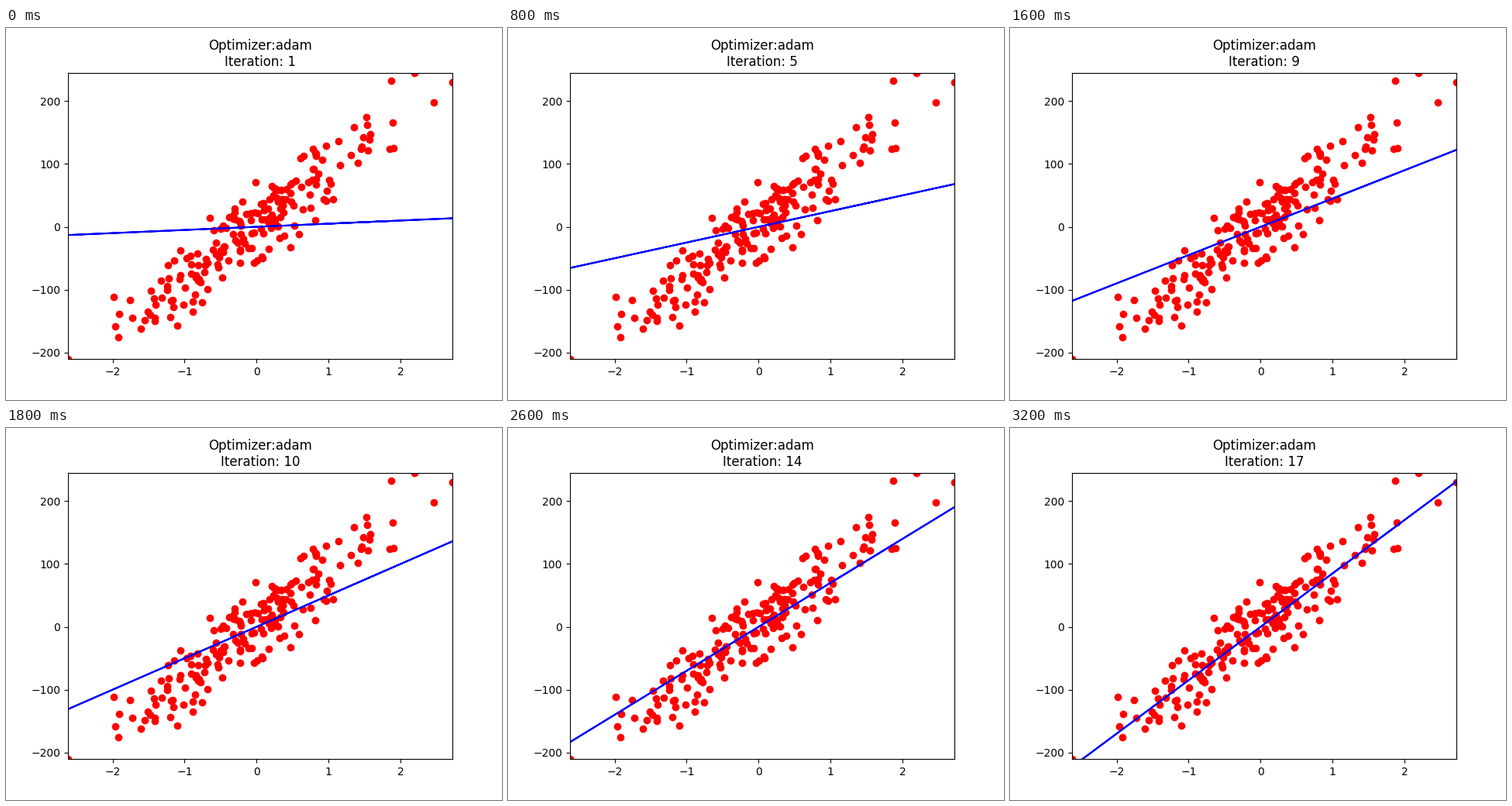
A matplotlib script that plays this animation: 640x480 px, repeating every 3600 ms.

```python
import matplotlib.pyplot as plt
import numpy as np
from matplotlib.animation import FuncAnimation

SAMPLES = 200
NOISE = 30
STEP = 5          # slope gained per iteration
LAST = 17
FRAMES = 18       # the last iteration is held for one extra frame


def make_regression(seed):
    """Noisy one-feature linear data in random order."""
    rng = np.random.RandomState(seed)
    x = rng.standard_normal(SAMPLES)
    slope = 100 * rng.uniform()
    y = slope * x + rng.normal(scale=NOISE, size=SAMPLES)
    order = np.arange(SAMPLES)
    rng.shuffle(order)
    return x[order], y[order]


x, y = make_regression(42)

fig, ax = plt.subplots(figsize=(6.4, 4.8), dpi=100)
ax.scatter(x, y, color="red")
line, = ax.plot(x, 0 * x, color="blue")
ax.set_xlim(x.min(), x.max())
ax.set_ylim(y.min(), y.max())
title = ax.set_title("")


def update(i):
    iteration = min(i + 1, LAST)
    line.set_ydata(STEP * iteration * x)
    title.set_text(f"Optimizer:adam\nIteration: {iteration}")
    return line, title


anim = FuncAnimation(fig, update, frames=FRAMES, interval=200,
                     repeat=True, repeat_delay=0)
plt.show()
```
